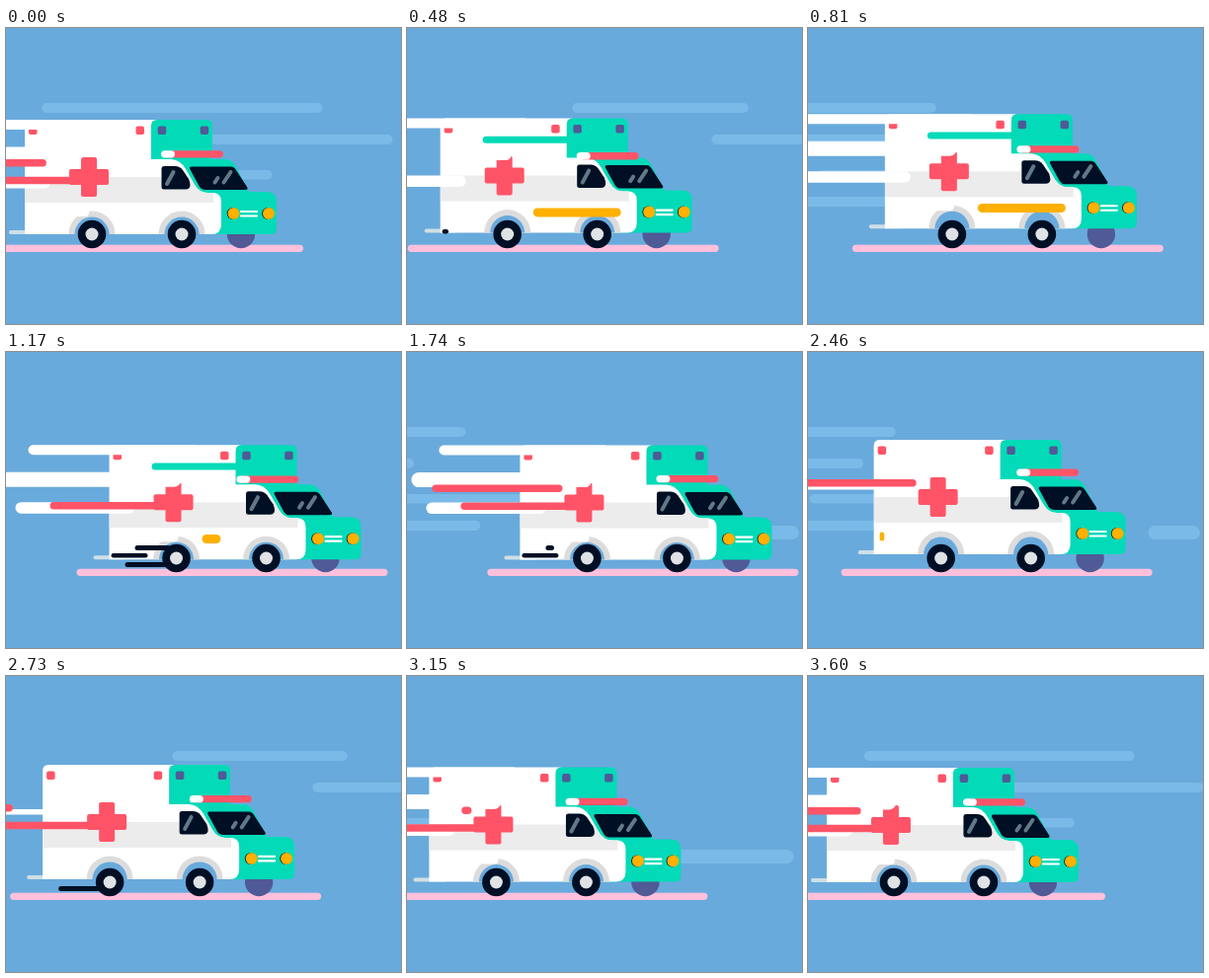
An HTML page with a canvas for the animation above (3.63 s loop, 400 by 300 pixels).

```html
<!DOCTYPE html>
<html lang="en">
<head>
<meta charset="utf-8">
<title>Ambulance</title>
<style>
html, body { margin: 0; width: 100%; height: 100%; overflow: hidden; background: #69aadc; }
canvas { display: block; }
</style>
</head>
<body>
<canvas id="stage" width="400" height="300"></canvas>
<script>
const ctx = document.getElementById('stage').getContext('2d');
const LOOP = 3630;
const C = {
  sky: '#69aadc', wind: '#7abae8', white: '#fff', band: '#ececec', arch: '#dcdcdc',
  red: '#ff5468', green: '#03dab8', dark: '#000f24', purple: '#4f5a96',
  yellow: '#ffb000', road: '#ffc0dc', hub: '#dfe3e6', glare: '#617986', bumper: '#cfdfe6'
};

const clamp = u => Math.min(1, Math.max(0, u));
const smooth = u => { u = clamp(u); return u * u * (3 - 2 * u); };
const lerp = (a, b, u) => a + (b - a) * u;
const wrap = t => ((t % LOOP) + LOOP) % LOOP;

// A soft hill of height 1 around a moment in time.
const bump = (t, centre, reach) =>
  Math.cos(clamp(Math.abs(t - centre) / reach) * Math.PI / 2) ** 2;

// A quick start that settles slowly; half way at `half`.
const surge = (t, half, power) => t <= 0 ? 0 : 1 / (1 + (half / t) ** power);

function driveX(t) {
  const turn = 1745;
  const back = surge(t - turn, 716, 4.3) / surge(LOOP - turn, 716, 4.3);
  return 87 + 98.2 * (surge(t, 735, 4.1) - back);
}

const bounceY = t =>
  93 - 6 * bump(t, 760, 410) + 2.4 * bump(t, 1550, 750) - 4 * bump(t, 2445, 900);

const sirenX = t => 70 - 10 * bump(t, 1080, 500) + 11 * bump(t, 2680, 500);
const sirenY = t => 31.2 + 3.3 * bump(t, 480, 500) - 3.2 * bump(t, 2160, 650);

function box(color, x, y, w, h, r = 0) {
  if (w < 0.8) return;
  ctx.fillStyle = color;
  ctx.beginPath();
  ctx.roundRect(x, y, w, h, r);
  ctx.fill();
}

const bar = (color, left, right, y, h) => box(color, left, y, right - left, h, h / 2);

function disc(color, x, y, r, from = 0) {
  ctx.fillStyle = color;
  ctx.beginPath();
  ctx.arc(x, y, r, from, 2 * Math.PI);
  ctx.fill();
}

const dome = (color, x, y, r) => disc(color, x, y, r, Math.PI);

function shape(color, d) {
  ctx.fillStyle = color;
  ctx.fill(new Path2D(d));
}

function stroke(color, width, d) {
  ctx.strokeStyle = color;
  ctx.lineWidth = width;
  ctx.lineCap = 'round';
  ctx.stroke(new Path2D(d));
}

// A speed line shoots out leftwards at `from` and is drawn in after it by `to`.
function streak(t, color, y, h, left, right, ...spells) {
  const travel = 300;
  for (const [from, to] of spells) {
    const age = wrap(t - from), life = wrap(to - from);
    if (age > life) continue;
    const head = lerp(right, left, smooth(age / travel));
    const tail = lerp(right, left, smooth((age - life + travel) / travel));
    bar(color, head, tail, y, h);
  }
}

function drawBodyStreaks(t) {
  streak(t, C.white, 0, 10, -150, 22, [2950, 2150]);
  streak(t, C.white, 27.5, 15, -178, 5, [372, 2080], [2950, 250]);
  streak(t, C.white, 58, 11.5, -163, -42, [2950, 2050]);
  streak(t, C.white, 45, 5.5, -143, -60, [1850, 3100]);
  streak(t, C.white, 90, 8, -64, 2, [700, 2050], [2950, 250]);
  streak(t, C.red, 40, 7.5, -157, -25, [1440, 2050], [2170, 2870], [3100, 225]);
  streak(t, C.red, 57.8, 7.5, -128, -15, [850, 2380], [2420, 330]);
  streak(t, C.green, 18.2, 7, -25, 66, [150, 1500], [1850, 2450]);
  streak(t, C.yellow, 90.8, 9, 26, 115, [150, 1260]);
  streak(t, C.yellow, 93.5, 9, -62, 37, [1850, 2500]);
}

function drawWheelStreaks(t) {
  streak(t, C.dark, 196, 5, -42, -6, [800, 1836]);
  streak(t, C.dark, 204, 4.6, -66, -29, [150, 560], [800, 2310]);
  streak(t, C.dark, 213, 5, -52, -10, [850, 1480], [2420, 3050]);
}

const GUSTS = [298, 1195, 1928, 2549, 3303];

// A gust's front races ahead and slows; its back lingers and catches up.
function gustLine(age, y, h, start, delay, duration) {
  const u = (age - delay) / duration;
  if (u <= 0 || u >= 1) return;
  bar(C.wind, lerp(start, -30, 1 - (1 - u) ** 2.4), lerp(start, -30, u ** 4), y, h);
}

function drawWind(t) {
  for (const gust of GUSTS) {
    const age = wrap(t - gust);
    gustLine(age, 76, 10, 347, 60, 520);
    gustLine(age, 108, 10, 410, 140, 415);
    gustLine(age, 144, 9.5, 270, 240, 480);
    gustLine(age, 171, 10, 270, 200, 385);
    gustLine(age, 176, 14, 397, 520, 245);
  }
}

const CAB = 'M60 6Q60 0 66 0H116Q122 0 122 6V40H135Q142 40 146 48L159 73H177Q187 73 187 83V110Q187 116 181 116H60Z';
const SHELL = 'M-68 6Q-68 0 -62 0H66Q60 0 60 6V40H80Q89 40 95 50L104 66Q109 74 117 74H122Q131 74 131 83V106Q131 116 121 116H-68Z';

function drawBody() {
  bar(C.bumper, -84, -50, 112, 4);
  shape(C.green, CAB);
  shape(C.white, SHELL);
  ctx.save();
  ctx.clip(new Path2D(SHELL));
  box(C.band, -68, 58, 191, 26);
  ctx.restore();

  for (const x of [-64, 44.5]) box(C.red, x, 6.5, 8.5, 8.5, 2);
  for (const x of [66.7, 109.7]) box(C.purple, x, 6.5, 8.5, 8.5, 2);
  box(C.red, -23, 50, 40, 16, 2);
  box(C.red, -11, 38, 16, 40, 2);

  shape(C.dark, 'M73 47H84Q89 47 92 51L98 60Q102 70 95 70.5H73Q70.5 70.5 70.5 68V49.5Q70.5 47 73 47Z');
  shape(C.dark, 'M101 47.5H141Q144 47.5 146 51L157 68Q159 71 155 71H114Q111 71 109 68L99.5 50.5Q98 47.5 101 47.5Z');
  stroke(C.glare, 4, 'M76 65L82.5 53M124.5 63.5L127.5 59M133.5 63.5L140.5 53');

  for (const x of [143.5, 179]) {
    disc(C.dark, x - 0.8, 95, 6);
    disc(C.yellow, x, 95, 6);
  }
  stroke(C.white, 2.2, 'M151 93H167M151 97.5H167');

  for (const x of [0, 91]) {
    dome(C.arch, x, 116, 23.5);
    dome(C.sky, x, 116, 17.5);
  }
}

function drawSiren(t) {
  const x = sirenX(t), y = sirenY(t);
  bar(C.red, x + 4, x + 63, y, 7.3);
  bar(C.white, x, x + 14, y, 7.3);
}

function draw(t) {
  box(C.sky, 0, 0, 400, 300);
  drawWind(t);

  ctx.save();
  ctx.translate(driveX(t), 0);
  bar(C.road, -101, 214, 219.7, 7.2);
  disc(C.purple, 151, 209, 14.2);

  ctx.save();
  ctx.translate(0, bounceY(t));
  drawBody();
  drawBodyStreaks(t);
  drawSiren(t);
  ctx.restore();

  drawWheelStreaks(t);
  for (const x of [0, 91]) {
    disc(C.dark, x, 209, 14.3);
    disc(C.hub, x, 209, 6.5);
  }
  ctx.restore();
}

const start = performance.now();
function tick() {
  draw((performance.now() - start) % LOOP);
  requestAnimationFrame(tick);
}
tick();
</script>
</body>
</html>
```
